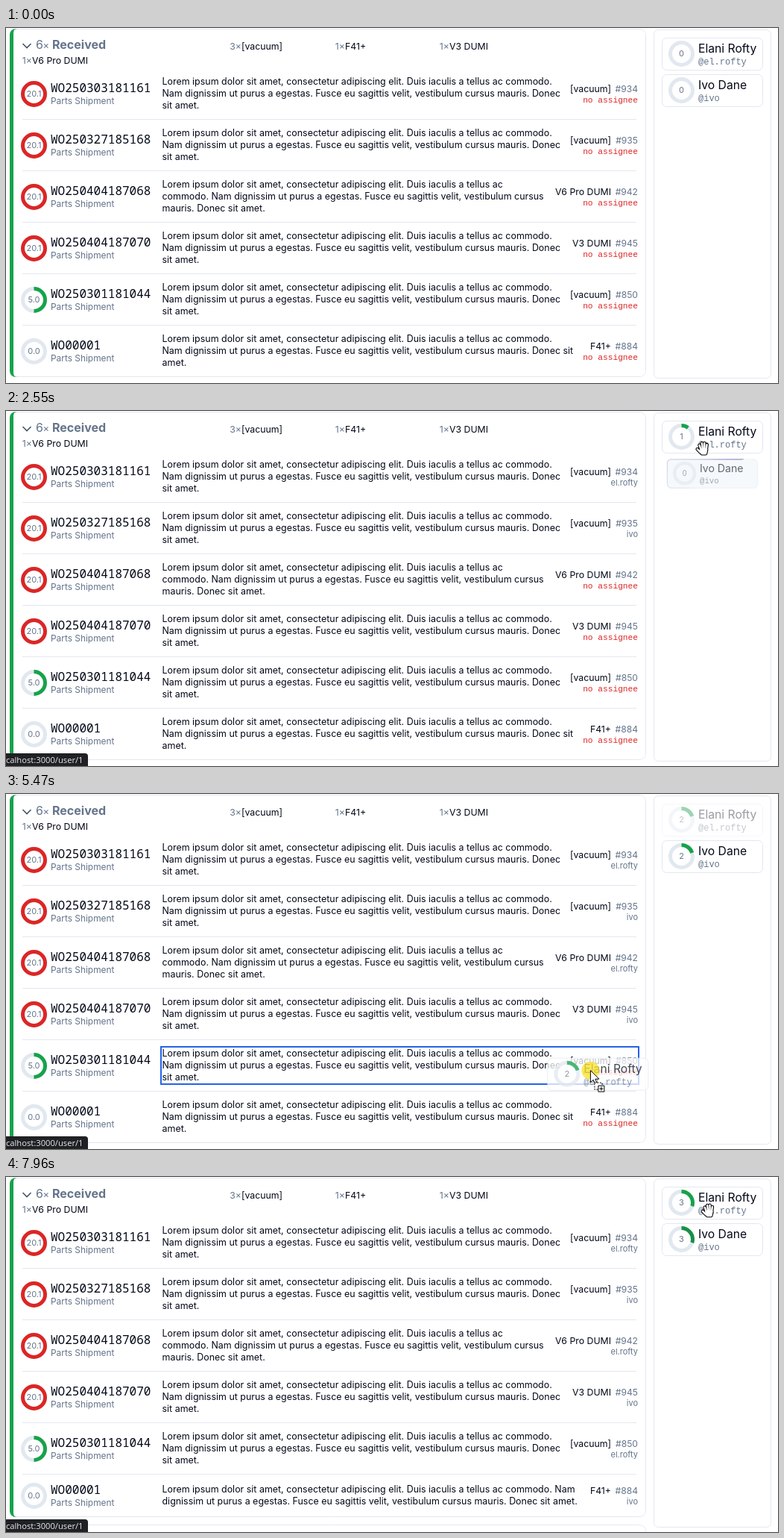
Recreate the animation shown at these times as an HTML page with a canvas. Size 1036 px wide and 476 px high, loop 8000 ms.

```html
<!DOCTYPE html>
<html lang="en">
<head>
<meta charset="utf-8">
<title>Work order board</title>
<style>
  html, body { margin: 0; width: 100%; height: 100%; overflow: hidden; background: #fff; }
  canvas { display: block; width: 1036px; height: 476px; }
</style>
</head>
<body>
<canvas id="stage"></canvas>
<script>
const W = 1036, H = 476, LOOP = 8000;
const canvas = document.getElementById('stage');
const ctx = canvas.getContext('2d');
const dpr = window.devicePixelRatio || 1;
canvas.width = W * dpr;
canvas.height = H * dpr;

const INK = '#020817', GRAY = '#64748b', LINE = '#e2e8f0';
const RED = '#dc2626', GREEN = '#16a34a', BLUE = '#2563eb';
const TURN = 2 * Math.PI;
const sans = (size, weight = 400) => `${weight} ${size}px Inter, sans-serif`;
const mono = size => `${size}px "Liberation Mono", monospace`;

const people = [
  { name: 'Elani Rofty', handle: 'el.rofty', link: 1, y: 13 },
  { name: 'Ivo Dane', handle: 'ivo', link: 3, y: 62 }
];
const CARD = { x: 880, w: 136, h: 44 };

const head = 'Lorem ipsum dolor sit amet, consectetur adipiscing elit. Duis iaculis a tellus ac';
const tail = 'dignissim ut purus a egestas. Fusce eu sagittis velit, vestibulum cursus';
const usual = [`${head} commodo.`, `Nam ${tail} mauris. Donec`, 'sit amet.'];
const early = [head, `commodo. Nam ${tail}`, 'mauris. Donec sit amet.'];
const late = [`${head} commodo.`, `Nam ${tail} mauris. Donec sit`, 'amet.'];
const short = [`${head} commodo. Nam`, `${tail} mauris. Donec sit amet.`];

const rows = [
  { id: 'WO250303181161', age: 20.1, model: '[vacuum]', no: 934, lines: usual },
  { id: 'WO250327185168', age: 20.1, model: '[vacuum]', no: 935, lines: usual },
  { id: 'WO250404187068', age: 20.1, model: 'V6 Pro DUMI', no: 942, lines: early },
  { id: 'WO250404187070', age: 20.1, model: 'V3 DUMI', no: 945, lines: usual },
  { id: 'WO250301181044', age: 5, model: '[vacuum]', no: 850, lines: usual },
  { id: 'WO00001', age: 0, model: 'F41+', no: 884, lines: late, folded: short }
];
const PITCH = 69;
const FOLD = 12;
const cell = i => ({ x: 207, y: 62 + PITCH * i, w: 643, h: 52 });

// The two people take turns; drag i ends on row i
const drags = [
  { grab: 490, drop: 1160, from: { x: 940, y: 33 }, to: { x: 782, y: 82 } },
  { grab: 1600, drop: 2200, from: { x: 931, y: 82 }, to: { x: 796, y: 152 } },
  { grab: 2800, drop: 3220, from: { x: 935, y: 50 }, to: { x: 798, y: 221 } },
  { grab: 3720, drop: 4440, from: { x: 962, y: 79 }, to: { x: 806, y: 293 } },
  { grab: 5060, drop: 5650, from: { x: 938, y: 30 }, to: { x: 777, y: 387 } },
  { grab: 6380, drop: 7050, from: { x: 920, y: 94 }, to: { x: 790, y: 434 } }
];
drags.forEach((d, i) => { d.who = i % 2; });
const ENTER = 130, REACH = 360, SAVE = 400, REST = 7740;

const clamp = v => Math.max(0, Math.min(1, v));
const smooth = v => { v = clamp(v); return v * v * (3 - 2 * v); };
const lerp = (a, b, k) => a + (b - a) * k;
const inside = (p, r) => p.x > r.x && p.x < r.x + r.w && p.y > r.y && p.y < r.y + r.h;
const cardBox = who => ({ ...CARD, y: people[who].y });

// Pointer: enter, then for each drag reach the card, carry it to its row, let go
const moves = [];
let at = { x: 1028, y: 120 }, free = ENTER;
for (const d of drags) {
  moves.push({ start: free, end: free + REACH, from: at, to: d.from, who: d.who });
  moves.push({ start: d.grab, end: lerp(d.grab, d.drop, 0.8), from: d.from, to: d.to, who: d.who });
  at = d.to;
  free = d.drop;
}
moves.push({ start: free, end: REST, from: at, to: { x: 942, y: 45 }, who: 0 });

function pointerAt(t) {
  const m = moves.findLast(m => m.start <= t);
  if (!m) return null;
  const k = smooth((t - m.start) / (m.end - m.start));
  return { x: lerp(m.from.x, m.to.x, k), y: lerp(m.from.y, m.to.y, k) };
}

function text(str, x, y, font, color, align = 'left') {
  ctx.font = font;
  ctx.fillStyle = color;
  ctx.textAlign = align;
  ctx.fillText(str, x, y);
}

function box(x, y, w, h, r, stroke, fill, width = 1) {
  ctx.beginPath();
  ctx.roundRect(x + width / 2, y + width / 2, w - width, h - width, r);
  if (fill) { ctx.fillStyle = fill; ctx.fill(); }
  if (stroke) { ctx.strokeStyle = stroke; ctx.lineWidth = width; ctx.stroke(); }
}

function ring(x, y, part, color, label) {
  const arc = (share, stroke) => {
    ctx.beginPath();
    ctx.arc(x, y, 15, -TURN / 4, -TURN / 4 + share * TURN);
    ctx.strokeStyle = stroke;
    ctx.lineWidth = 5;
    ctx.stroke();
  };
  arc(1, LINE);
  if (part > 0) arc(Math.min(part, 1), color);
  text(label, x, y + 3.5, sans(11), GRAY, 'center');
}

function panel(y, h) {
  ctx.save();
  ctx.beginPath();
  ctx.roundRect(5, y, 854, h, 8);
  ctx.clip();
  ctx.fillStyle = GREEN;
  ctx.fillRect(5, y, 12, h);
  box(10, y, 849, h, [4, 8, 8, 4], LINE, '#fff');
  ctx.fillStyle = '#fff';
  ctx.fillRect(10, y + 5, 1, h - 10);
  ctx.restore();
}

function header() {
  ctx.beginPath();
  ctx.moveTo(22.5, 21);
  ctx.lineTo(28, 26.5);
  ctx.lineTo(33.5, 21);
  ctx.strokeStyle = '#475569';
  ctx.lineWidth = 1.6;
  ctx.stroke();
  text('6', 40, 28, sans(16), GRAY);
  text('×', 49.5, 28, sans(13), GRAY);
  text('Received', 62, 28, sans(16, 700), GRAY);
  const total = (n, label, x, y) => {
    text(n + '×', x, y, sans(12.3), GRAY, 'right');
    text(label, x, y, sans(12.3), INK);
  };
  total(3, '[vacuum]', 316, 29);
  total(1, 'F41+', 455, 29);
  total(1, 'V3 DUMI', 595, 29);
  total(1, 'V6 Pro DUMI', 35, 48);
}

function row(i, t) {
  const r = rows[i], taken = t >= drags[i].drop;
  const folded = taken && r.folded;
  const lines = folded || r.lines;
  const mid = 88 + PITCH * i - (folded ? FOLD / 2 : 0);
  ring(37.5, mid + 0.5, r.age / 10, r.age > 10 ? RED : GREEN, r.age.toFixed(1));
  text(r.id, 60, mid - 2, '16px "Noto Sans Mono", monospace', INK);
  text('Parts Shipment', 60, mid + 14, sans(11.9), GRAY);
  lines.forEach((line, n) =>
    text(line, 209.5, mid + 4 + 16 * (n - (lines.length - 1) / 2), sans(12.45), INK));
  text('#' + r.no, 848, mid - 2, sans(12.1), GRAY, 'right');
  text(r.model, 812, mid - 2, sans(12.3), INK, 'right');
  if (taken) text(people[drags[i].who].handle, 848, mid + 12, sans(11), GRAY, 'right');
  else text('no assignee', 848, mid + 12, mono(11.2), RED, 'right');
  if (i < rows.length - 1) {
    ctx.fillStyle = LINE;
    ctx.fillRect(22, 122 + PITCH * i, 824, 1);
  }
}

// Count, arc length and arc colour of one person
function load(who, t) {
  const saved = drags.filter(d => d.who === who && d.drop + SAVE <= t);
  if (!saved.length) return { count: 0, part: 0 };
  const since = t - saved.at(-1).drop - SAVE;
  const part = (saved.length - 1 + smooth(since / 300)) / 10;
  const k = clamp(since / 600);
  const color = `rgb(${lerp(15, 22, k)},${lerp(45, 163, k)},${lerp(42, 74, k)})`;
  return { count: saved.length, part, color };
}

function cardFace(who, t, x, y, fill = '#fff') {
  const p = people[who], l = load(who, t);
  box(x, y, CARD.w, CARD.h, 6, LINE, fill);
  ring(x + 26.5, y + 21.5, l.part, l.color, l.count);
  text(p.name, x + 49, y + 20, sans(15.7), INK);
  text('@' + p.handle, x + 49, y + 36, mono(12), GRAY);
}

function beam(y, since) {
  const turn = (since / 1000 - 0.42) * TURN;
  const g = ctx.createConicGradient(turn, CARD.x + CARD.w / 2, y + CARD.h / 2);
  g.addColorStop(0, 'rgba(110,90,180,0)');
  g.addColorStop(0.42, 'rgba(110,90,180,0)');
  g.addColorStop(1, 'rgba(90,70,165,1)');
  box(CARD.x, y, CARD.w, CARD.h, 6, g, null, 1.4);
}

function card(who, t, held) {
  const y = people[who].y;
  const last = drags.findLast(d => d.who === who && d.drop <= t);
  const since = last ? t - last.drop : Infinity;
  const k = last ? smooth(since / 150) * (1 - smooth((since - SAVE) / 150)) : 0;
  const cx = CARD.x + CARD.w / 2, cy = y + CARD.h / 2;
  ctx.save();
  ctx.translate(cx, cy);
  ctx.scale(1 - 0.1 * k, 1 - 0.1 * k);
  ctx.translate(-cx, -cy);
  ctx.globalAlpha = held ? 0.4 : 1 - 0.4 * k;
  cardFace(who, t, CARD.x, y, k > 0.3 ? '#f1f5f9' : '#fff');
  if (since < SAVE) beam(y, since);
  ctx.restore();
}

function polygon(points, fill, stroke, width) {
  ctx.beginPath();
  points.forEach(([x, y]) => ctx.lineTo(x, y));
  ctx.closePath();
  ctx.fillStyle = fill;
  ctx.fill();
  ctx.strokeStyle = stroke;
  ctx.lineWidth = width;
  ctx.stroke();
}

function arrow() {
  polygon([[0, 0], [0, 16], [3.8, 12.6], [6.3, 18.4], [8.8, 17.4], [6.4, 11.6], [11.5, 11.4]],
    '#fff', '#000', 1);
}

function copyBadge() {
  ctx.save();
  ctx.setLineDash([2, 1.5]);
  box(5, 16, 11, 10, 0, '#000', '#fff');
  ctx.restore();
  box(10, 20, 9, 9, 0, '#000', '#fff');
  ctx.fillStyle = '#000';
  ctx.fillRect(12, 24, 5, 1);
  ctx.fillRect(14, 22, 1, 5);
}

function hand() {
  ctx.lineCap = ctx.lineJoin = 'round';
  const draw = (color, width) => {
    polygon([[-2.6, 1.5], [5.4, 1.5], [4.2, 7], [-0.8, 7]], color, color, width);
    ctx.beginPath();
    for (let i = 0; i < 4; i++) {
      ctx.moveTo(-4.2 + 3.35 * i, -7.4 + 1.2 * (i - 1.6) ** 2);
      ctx.lineTo(-2 + 2.3 * i, 2);
    }
    ctx.moveTo(-7, 1);
    ctx.lineTo(-2.6, 5.4);
    ctx.stroke();
  };
  draw('#000', 4.6);
  draw('#fff', 2.5);
}

function noDrop() {
  ctx.beginPath();
  ctx.arc(0, 0, 7, 0, TURN);
  ctx.moveTo(-5, -5);
  ctx.lineTo(5, 5);
  ctx.strokeStyle = '#c8640f';
  ctx.lineWidth = 2.4;
  ctx.stroke();
}

function pointer(p, drag, over) {
  ctx.save();
  ctx.translate(p.x, p.y);
  if (drag) {
    ctx.beginPath();
    ctx.arc(0, 0, 12, 0, TURN);
    ctx.fillStyle = 'rgba(250,227,45,.78)';
    ctx.fill();
    if (over) { arrow(); copyBadge(); }
    else noDrop();
  } else if (people.some((_, who) => inside(p, cardBox(who)))) {
    hand();
  } else {
    arrow();
  }
  ctx.restore();
}

// The link stays in view after the pointer has left its card
function status(t) {
  const seen = moves.findLast(m => m.end - 60 <= t);
  if (!seen) return;
  ctx.beginPath();
  ctx.roundRect(-2, 459, 112, 20, [0, 4, 0, 0]);
  ctx.fillStyle = '#202124';
  ctx.fill();
  text('localhost:3000/user/' + people[seen.who].link, 103.5, 472,
    '11.2px "Open Sans", "Noto Sans", sans-serif', '#e8eaed', 'right');
}

function draw(t) {
  ctx.setTransform(dpr, 0, 0, dpr, 0, 0);
  ctx.fillStyle = '#fff';
  ctx.fillRect(0, 0, W, H);

  const folded = t >= drags.at(-1).drop;
  const height = 467 - (folded ? FOLD : 0);
  panel(1, height);
  if (folded) panel(height + 11, 60);
  box(869, 2, 158, 468, 6, LINE, '#fff');
  header();
  rows.forEach((_, i) => row(i, t));

  const p = pointerAt(t);
  const drag = drags.find(d => t >= d.grab && t < d.drop);
  const over = drag && rows.map((_, i) => cell(i)).find(c => inside(p, c));
  if (over) box(over.x, over.y, over.w, over.h, 0, BLUE, null, 2);

  people.forEach((_, who) => card(who, t, drag && drag.who === who));
  if (drag) {
    const grip = { x: drag.from.x - CARD.x, y: drag.from.y - people[drag.who].y };
    ctx.save();
    ctx.globalAlpha = 0.74;
    cardFace(drag.who, t, p.x - grip.x, p.y - grip.y);
    ctx.restore();
  }
  status(t);
  if (p) pointer(p, drag, over);
}

const start = performance.now();
function tick() {
  draw((performance.now() - start) % LOOP);
  requestAnimationFrame(tick);
}
tick();
</script>
</body>
</html>
```
